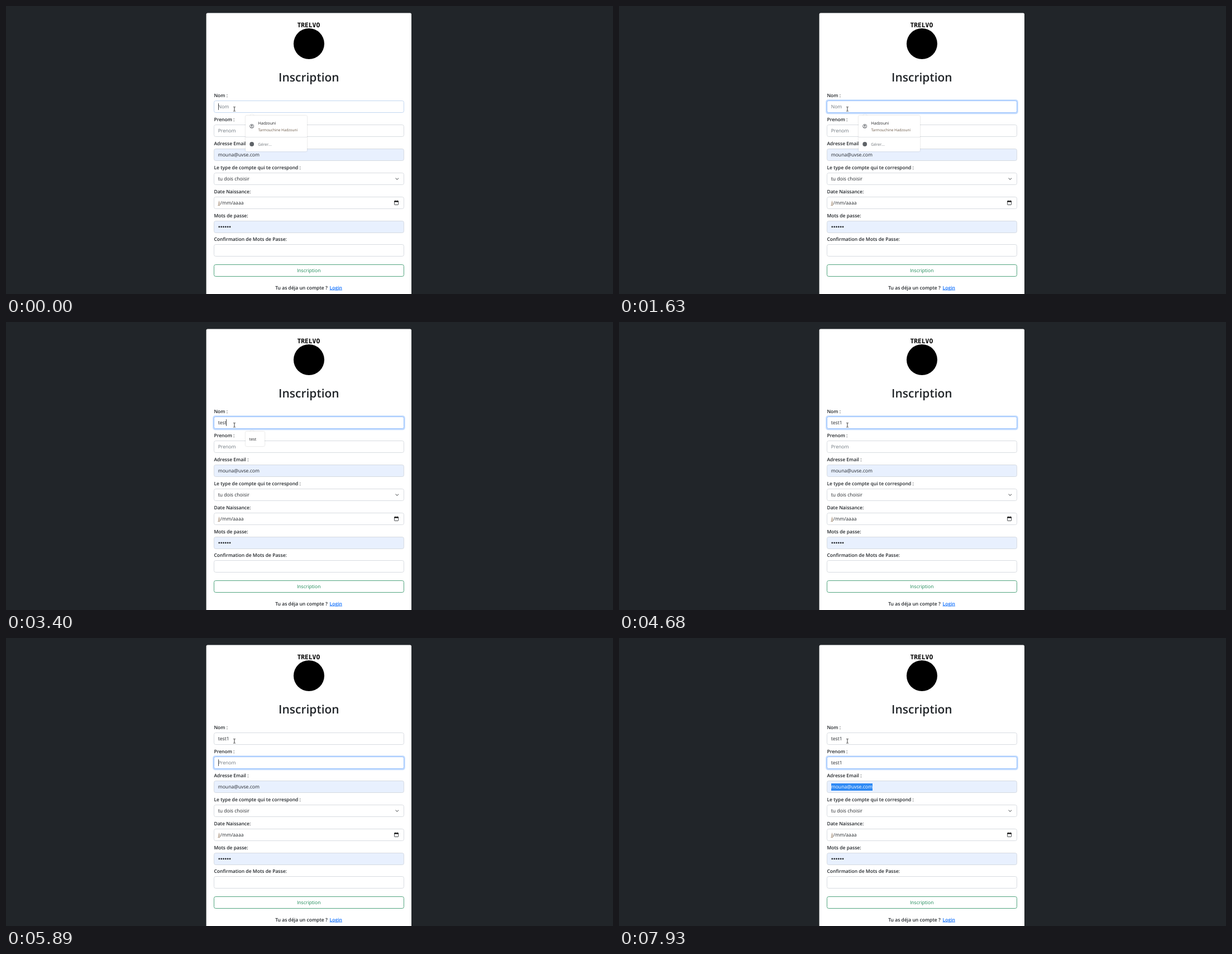
These frames come from a looping animation (1087x515 px, 8000 ms). An HTML page:

```html
<!DOCTYPE html>
<html lang="fr">
<head>
<meta charset="utf-8">
<title>Inscription</title>
<style>
  html, body { margin: 0; width: 100%; height: 100%; overflow: hidden; background: #212529; }
  svg { display: block; width: 1087px; height: 515px; }
  text { font: 400 8.6px "Open Sans", "Noto Sans", sans-serif; fill: #212529; text-rendering: geometricPrecision; white-space: pre; }
  .label { font-weight: 600; font-size: 8.55px; }
  .title { font-weight: 600; font-size: 21px; text-anchor: middle; }
  .brand { font: 700 11.3px "DejaVu Sans Mono", monospace; fill: #000; text-anchor: middle; }
  .hint { fill: #6c757d; }
  .item { font-size: 7.15px; fill: #202124; }
  .sub { font-size: 6.55px; fill: #6b5846; }
  .muted { fill: #70757a; }
  .box { fill: #fff; stroke: #ced4da; stroke-width: .8; }
  .filled { fill: #e8f0fe; }
  .panel { fill: #fff; filter: drop-shadow(0 .8px .8px rgba(0, 0, 0, .2)); }
  .line { fill: none; stroke: #212529; }
</style>
</head>
<body>
<svg id="stage" viewBox="0 0 1087 515">
  <rect width="1087" height="515" fill="#212529"/>
  <rect x="358.6" y="12.5" width="367.4" height="520" rx="2.5" fill="#fff"/>
  <text class="brand" x="541.8" y="37.8">TRELVO</text>
  <circle cx="542.5" cy="67.5" r="27.5"/>
  <text class="title" x="542.4" y="134.5">Inscription</text>
  <g id="form"></g>
  <path class="line" d="M697.6 307.8l2.7 2.6 2.7-2.6" stroke-width=".95"/>
  <g id="calendar">
    <rect class="line" x="695.6" y="348.9" width="6.9" height="6.6" rx=".6" stroke-width=".8"/>
    <path d="M695.3 348.6h7.5v1.9h-7.5zM696.6 347.7h.9v1h-.9zM700.6 347.7h.9v1h-.9z"/>
  </g>
  <g id="dots" fill="#212529"></g>
  <rect x="372.5" y="462.5" width="340" height="21" rx="3" fill="#fff" stroke="#198754" stroke-width=".75"/>
  <text x="542.2" y="476.3" text-anchor="middle" style="fill:#198754">Inscription</text>
  <text class="label" x="482.2" y="506.5">Tu as déja un compte ?</text>
  <text class="label" x="579.6" y="506.5" style="fill:#0d6efd;text-decoration:underline">Login</text>

  <g id="selected">
    <rect x="380" y="260" width="74" height="13" fill="#2f8af5"/>
    <text id="selectedText" x="379.7" y="269.2" style="fill:#fff"></text>
  </g>
  <rect id="caret" width="1" height="12" fill="#4a4d50"/>

  <g id="popup">
    <path class="panel" d="M436 197l4.5-4 4.5 4z" opacity=".6"/>
    <rect id="panel" class="panel" x="429" y="196" rx="2"/>
    <g id="profile">
      <g fill="none" stroke="#5f6368" stroke-width=".9">
        <circle cx="440.2" cy="215" r="3.5"/>
        <path d="M437.8 217.4q2.4-2 4.8 0"/>
      </g>
      <circle cx="440.2" cy="213.9" r="1.3" fill="#5f6368"/>
      <text class="item" x="451.4" y="211.6">Hadzouni</text>
      <text class="sub" x="451.4" y="223.6">Tarmouchine Hadzouni</text>
      <path d="M429 234.5h110" stroke="#e3e5e8"/>
      <circle cx="440.2" cy="247" r="3.9" fill="#5f6368"/>
      <text class="item muted" x="451.2" y="249.6">Gérer...</text>
    </g>
    <text id="first" class="item" x="435.8" y="211.6">test</text>
    <text id="second" class="item" x="435.8" y="233.6">testeur</text>
  </g>

  <path d="M407.2 180.5h1.3l.5.5.5-.5h1.3M409 181v6.6M407.2 188.1h1.3l.5-.5.5.5h1.3" fill="none" stroke="#222" stroke-width=".9"/>
</svg>
<script>
const $ = id => document.getElementById(id);
const LOOP = 8000;
const TEXT_X = 379.7;
const MAIL = 'mouna@uvse.com';

// label, top of the box, box height, text, classes
const fields = [
  ['Nom :', 169, 21, '', ''],
  ['Prenom :', 212, 21, '', ''],
  ['Adresse Email :', 255, 21, MAIL, 'filled'],
  ['Le type de compte qui te correspond :', 298, 21, 'tu dois choisir', ''],
  ['Date Naissance:', 341, 21, '', ''],
  ['Mots de passe:', 384, 21, '', 'filled'],
  ['Confirmation de Mots de Passe:', 426, 21, '', '']
];

function add(parent, tag, attrs, content = '') {
  const el = document.createElementNS('http://www.w3.org/2000/svg', tag);
  for (const key in attrs) el.setAttribute(key, attrs[key]);
  el.textContent = content;
  return parent.appendChild(el);
}

const rows = fields.map(([label, y, height, text, kind]) => {
  const form = $('form');
  add(form, 'text', { class: 'label', x: 372.4, y: y - 5.8 }, label);
  const ring = add(form, 'rect', {
    x: 370.2, y: y - 1.8, width: 344.6, height: 26, rx: 4.5, fill: '#c2dbfe'
  });
  const box = add(form, 'rect', {
    class: 'box ' + kind, x: 372.5, y: y + .5, width: 340, height, rx: 3
  });
  const value = add(form, 'text', { x: TEXT_X, y: y + 14.2 }, text);
  return { ring, box, value };
});

const date = rows[4].value;
add(date, 'tspan', { fill: '#80603f' }, 'jj');
add(date, 'tspan', {}, '/mm/aaaa');
for (let i = 0; i < 6; i++) add($('dots'), 'circle', { cx: 381.8 + i * 3.85, cy: 394.9, r: 1.35 });
$('selectedText').textContent = MAIL;

// Each step changes only the listed properties.
const steps = [
  [0, { nom: '', prenom: '', active: 0, caret: true, ring: -1, popup: 'profile', selected: false }],
  [120, { ring: 0 }],
  [510, { caret: false }],
  [1070, { caret: true }],
  [1630, { caret: false }],
  [2190, { caret: true }],
  [2650, { caret: false }],
  [3040, { nom: 't', caret: true }],
  [3160, { nom: 'te', popup: 'two' }],
  [3280, { nom: 'tes', popup: 'one' }],
  [3400, { nom: 'test' }],
  [3530, { popup: 'fade' }],
  [3660, { popup: '' }],
  [4030, { caret: false }],
  [4150, { nom: 'test1', caret: true }],
  [4680, { caret: false }],
  [5210, { caret: true }],
  [5770, { active: 1 }],
  [5890, { ring: 1 }],
  [6290, { prenom: 't' }],
  [6410, { popup: 'two' }],
  [6540, { prenom: 'te', popup: 'one' }],
  [6790, { prenom: 'tes' }],
  [6910, { prenom: 'test', popup: 'fade' }],
  [7030, { popup: '' }],
  [7410, { prenom: 'test1' }],
  [7930, { caret: false, selected: true }]
];

const sizes = { profile: [110, 64], two: [41, 48], one: [34, 26], fade: [34, 26] };
const show = (el, on) => el.setAttribute('visibility', on ? 'inherit' : 'hidden');

function setValue(row, text, hint) {
  row.value.textContent = text || hint;
  row.value.setAttribute('class', text ? '' : 'hint');
}

function drawPopup(kind, active) {
  const popup = $('popup');
  show(popup, kind);
  if (!kind) return;
  const [width, height] = sizes[kind];
  $('panel').setAttribute('width', width);
  $('panel').setAttribute('height', height);
  popup.setAttribute('transform', `translate(0 ${active * 43})`);
  popup.setAttribute('opacity', kind === 'fade' ? .8 : 1);
  show($('profile'), kind === 'profile');
  show($('first'), kind !== 'profile');
  show($('second'), kind === 'two');
}

function draw(state) {
  setValue(rows[0], state.nom, 'Nom');
  setValue(rows[1], state.prenom, 'Prenom');
  rows.forEach(({ ring, box }, i) => {
    show(ring, i === state.ring);
    const idle = state.ring < 0 && i === 0 ? '#b4cdee' : '#ced4da';
    box.style.stroke = i === state.ring ? '#86b7fe' : idle;
  });

  const typed = state.active ? state.prenom : state.nom;
  const end = typed ? rows[state.active].value.getComputedTextLength() : 0;
  const caret = $('caret');
  caret.setAttribute('x', Math.max(380, Math.floor(TEXT_X + end)));
  caret.setAttribute('y', 174 + state.active * 43);
  show(caret, state.caret);

  show($('selected'), state.selected);
  drawPopup(state.popup, state.active);
}

const start = performance.now();
let shown = -1;

function tick() {
  const time = (performance.now() - start) % LOOP;
  const count = steps.filter(([at]) => at <= time).length;
  if (count !== shown) {
    shown = count;
    draw(Object.assign({}, ...steps.slice(0, count).map(step => step[1])));
  }
  requestAnimationFrame(tick);
}
tick();
</script>
</body>
</html>
```
